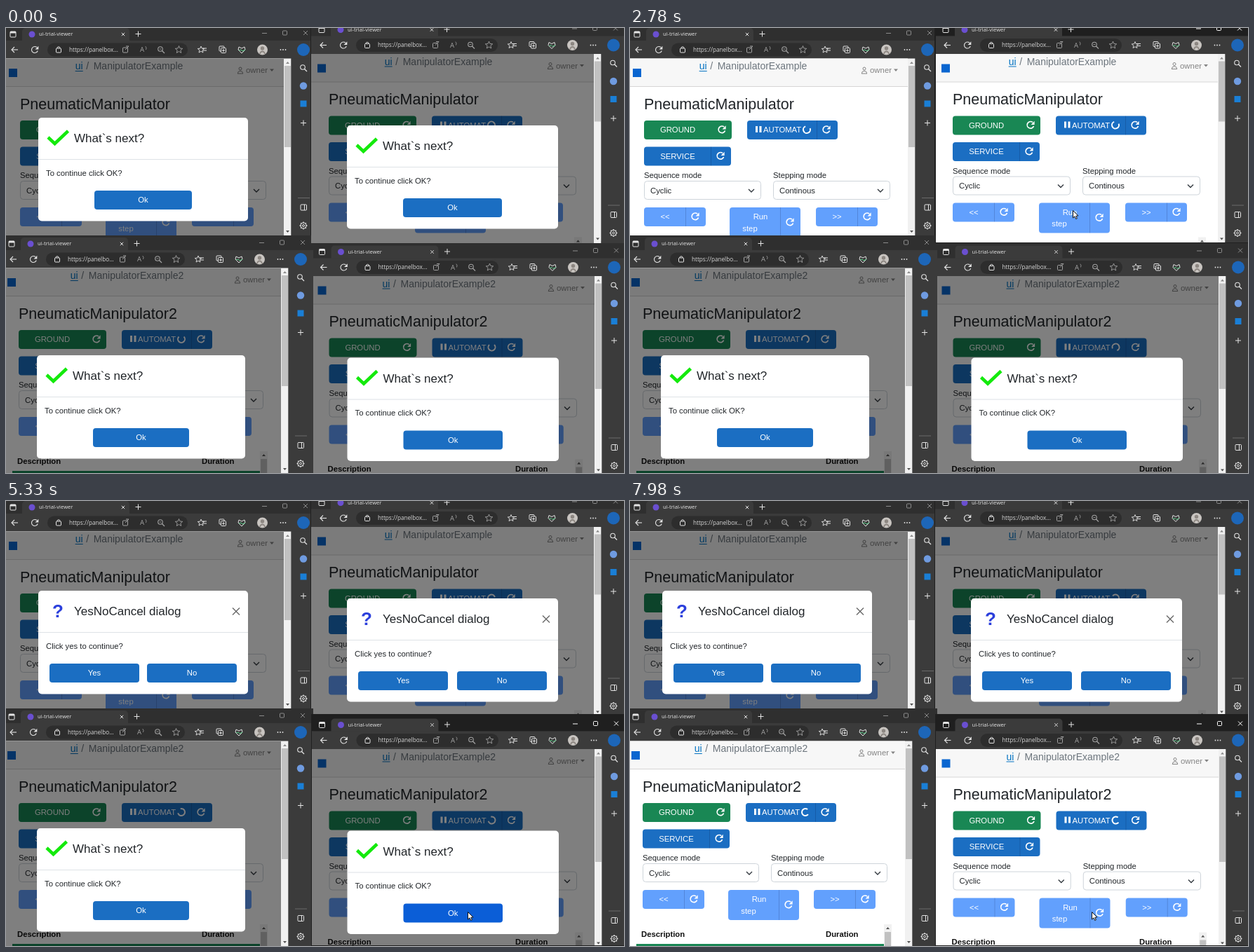
These frames come from a looping animation (881 by 635 pixels, 8 s). An HTML page with a canvas:

```html
<!DOCTYPE html>
<html lang="en">
<head>
<meta charset="utf-8">
<title>Manipulator panels</title>
<style>
  html, body { margin: 0; width: 100%; height: 100%; overflow: hidden; background: #333; }
  canvas { display: block; }
</style>
</head>
<body>
<canvas id="stage" width="881" height="635"></canvas>
<script>
const ctx = document.getElementById('stage').getContext('2d');
const LOOP = 8000, SPIN = 780;
const TOP_CLOSE = 1660, TOP_ASK = 4650, BOTTOM_CLICK = 5270, BOTTOM_CLOSE = 5400;
const PAGE_FONT = '"Liberation Sans", Arial, sans-serif';
const UI_FONT = '"Open Sans", "Noto Sans", sans-serif';
const BLUE = '#1b6ec2', HOVER = '#0b5ed7', GREEN = '#198754', PALE = '#62a0fd', INK = '#212529';
const CHROME = '#3b3b3b', ICON = '#e4e4e4', DIM = '#a2a2a2';
const PAGE_TOP = 43.5;

// x, y: origin of the contents; w: page width; rect: outer bounds on the stage
const topLeft = { x: 0, y: 0, w: 396, rect: [0, 0, 434, 296], thumb: 170, down: 290, panel: 256, dialogY: 128,
  name: '', url: 'https://panelbox...', phase: Math.PI };
const topRight = { x: 440, y: -6.5, w: 398, rect: [435, 0, 446, 307], thumb: 140, down: 307, panel: 273, dialogY: 145.5,
  name: '', url: 'https://panelbox...', phase: Math.PI };
const bottomLeft = { x: -2, y: 299, w: 394, rect: [0, 296, 438, 339], thumb: 212, down: 330, panel: 296.5, dialogY: 168,
  name: '2', url: 'https://panelbo...', phase: 0 };
const bottomRight = { x: 440.5, y: 310.5, w: 398.5, rect: [435, 304, 446, 331], thumb: 204.5, down: 320, panel: 288, dialogY: 160,
  name: '2', url: 'https://panelbox...', phase: 0 };

function text(str, x, y, size, color, { align = 'left', font = PAGE_FONT, bold = false } = {}) {
  ctx.font = `${bold ? 'bold ' : ''}${size}px ${font}`;
  ctx.textAlign = align;
  ctx.fillStyle = color;
  ctx.fillText(str, x, y + size * 0.35);
}
function rect(x, y, w, h, color) {
  ctx.fillStyle = color;
  ctx.fillRect(x, y, w, h);
}
function rounded(x, y, w, h, r, fill, stroke) {
  ctx.beginPath();
  ctx.roundRect(x, y, w, h, r);
  if (fill) { ctx.fillStyle = fill; ctx.fill(); }
  if (stroke) { ctx.strokeStyle = stroke; ctx.lineWidth = 1; ctx.stroke(); }
}
function path(points, color, width = 1, close = false) {
  ctx.beginPath();
  for (let i = 0; i < points.length; i += 2) ctx.lineTo(points[i], points[i + 1]);
  if (close) ctx.closePath();
  ctx.strokeStyle = color;
  ctx.lineWidth = width;
  ctx.stroke();
}
function shape(points, color) {
  ctx.beginPath();
  for (let i = 0; i < points.length; i += 2) ctx.lineTo(points[i], points[i + 1]);
  ctx.fillStyle = color;
  ctx.fill();
}
function disc(x, y, r, color) {
  ctx.beginPath();
  ctx.arc(x, y, r, 0, 7);
  ctx.fillStyle = color;
  ctx.fill();
}
function arc(x, y, r, from, to, color, width = 1) {
  ctx.beginPath();
  ctx.arc(x, y, r, from, to);
  ctx.strokeStyle = color;
  ctx.lineWidth = width;
  ctx.stroke();
}
const ring = (x, y, r, color, width) => arc(x, y, r, 0, 2 * Math.PI, color, width);
const plus = (x, y, r, color) => { path([x - r, y, x + r, y], color); path([x, y - r, x, y + r], color); };
const cross = (x, y, r, color, width) => {
  path([x - r, y - r, x + r, y + r], color, width);
  path([x - r, y + r, x + r, y - r], color, width);
};
function refresh(x, y, r = 4.8, color = '#fff', width = 1.7) {
  arc(x, y, r, 0.35, 5.4, color, width);
  shape([x + r + 0.8, y - r - 0.8, x + r + 0.8, y - 0.4, x + 0.6, y - 0.4], color);
}
function star(x, y, r, color) {
  const points = [];
  for (let i = 0; i < 10; i++) {
    const a = i * Math.PI / 5 - Math.PI / 2, d = i % 2 ? r * 0.45 : r;
    points.push(x + d * Math.cos(a), y + d * Math.sin(a));
  }
  path(points, color, 0.9, true);
}
function magnifier(x, y, color) {
  ring(x - 1, y - 1, 3.3, color, 1.1);
  path([x + 1.5, y + 1.5, x + 5, y + 5], color, 1.2);
}

function titleBar(win, active) {
  const s = win.w - 396, bar = active ? '#1f1f1f' : '#2f2f2f', control = active ? '#fff' : '#8c8c8c';
  rect(-8, -8, 460, 26, bar);
  rounded(23, 0, 153, 24, [5, 5, 0, 0], CHROME);
  rounded(6, 5, 8, 8, 1, null, ICON);
  rect(6, 5, 8, 2.5, ICON);
  disc(37, 9, 4.5, '#6a4fd0');
  text('ui-trial-viewer', 47, 8.7, 7.6, ICON, { font: UI_FONT });
  cross(167, 9, 2.2, ICON);
  plus(188.5, 8.5, 4, ICON);
  path([365 + s, 7.5, 372 + s, 7.5], control);
  rounded(394.5 + s, 4, 6, 6, 1, null, control);
  cross(427 + s, 7, 3, control);
}

function toolBar(win) {
  const s = win.w - 396, y = 31;
  rect(-8, 18, 460, 26, CHROME);
  path([17, y, 8, y], ICON, 1.1);
  path([12, y - 4, 8, y, 12, y + 4], ICON, 1.1);
  refresh(41, y, 4.5, ICON, 1.1);
  rounded(59, 21.5, 200 + s, 19, 9.5, '#2d2d2d');
  rounded(71.5, y - 2, 7, 6, 1, null, ICON);
  arc(75, y - 2, 2.2, Math.PI, 0, ICON);
  text(win.url, 90, y, 8.2, '#d6d6d6', { font: UI_FONT });
  ctx.save();
  ctx.translate(s, 0);
  rounded(166.5, y - 3, 7, 7, 1, null, DIM);
  path([170, y, 175, y - 5, 171, y - 5], DIM);
  text('A', 191, y, 9.5, DIM, { font: UI_FONT });
  arc(196, y - 2, 4, -0.8, 0.5, DIM, 0.8);
  magnifier(221, y, DIM);
  path([218.5, y - 1, 221.5, y - 1], DIM, 0.8);
  star(246.5, y, 5.5, DIM);
  star(278, y, 5, ICON);
  path([280, y - 2, 286, y - 2], ICON);
  path([281, y + 1, 286, y + 1], ICON);
  rounded(304, y - 5, 7, 7, 1, null, ICON);
  rounded(306.5, y - 2.5, 7, 7, 1, CHROME, ICON);
  plus(310, y + 1, 2, ICON);
  path([336, y + 5, 331, y, 332, y - 4, 336, y - 2, 340, y - 4, 341, y, 336, y + 5], ICON);
  path([332, y + 1, 335, y, 337, y + 2, 341, y], '#5bd18b');
  disc(365.5, y, 7.5, '#c9c5c1');
  disc(365.5, y - 2, 2.7, '#8d8782');
  arc(365.5, y + 6, 3.4, Math.PI, 0, '#8d8782', 2);
  for (let i = 0; i < 3; i++) disc(391.5 + i * 3.5, y, 0.9, ICON);
  ctx.restore();
}

function sideBar(win) {
  const x = win.w + 28;
  rect(win.w + 10.5, PAGE_TOP, 60, 320, CHROME);
  disc(x, 31, 9, '#1d66b8');
  magnifier(x, 57, ICON);
  disc(x, 82.5, 5.2, '#6f9be0');
  rect(x - 4.5, 103.5, 9, 9, '#1a7fd6');
  plus(x, 135.5, 4, ICON);
  path([x - 8, win.panel - 13.5, x + 9, win.panel - 13.5], '#6a6a6a');
  rounded(x - 4, win.panel - 4, 8.5, 8, 1, null, ICON);
  path([x + 1.5, win.panel - 4, x + 1.5, win.panel + 4], ICON);
  const gy = win.panel + 26;
  ring(x, gy, 4, ICON, 1.1);
  ring(x, gy, 1.5, ICON, 1);
  for (let a = 0; a < 8; a++) {
    const c = Math.cos(a * Math.PI / 4), n = Math.sin(a * Math.PI / 4);
    path([x + 4 * c, gy + 4 * n, x + 5.4 * c, gy + 5.4 * n], ICON, 1.3);
  }
}

function splitButton(x, y, w, h, color, split, label, labelX) {
  rounded(x, y, w, h, 4, color);
  if (color !== GREEN) rect(x + split, y, 1, h, 'rgba(0,0,40,.16)');
  refresh(x + split + 14, y + h / 2 - 0.7);
  if (label) text(label, x + labelX, y + 13.3, 11.3, '#fff', { align: 'center' });
}

function select(x, w, label, value) {
  text(label, x, 210.5, 11.3, INK);
  rounded(x + 0.5, 218.5, w - 1, 26, 4, '#fff', '#ced4da');
  text(value, x + 9, 232, 11.3, INK);
  path([x + w - 18, 230, x + w - 14, 234, x + w - 10, 230], '#343a40', 1.4);
}

function breadcrumb(win) {
  const size = 14, page = 'ManipulatorExample' + win.name;
  ctx.font = `${size}px ${PAGE_FONT}`;
  const x = 175.5 + (win.w - 396) / 2 - (26 + ctx.measureText(page).width) / 2;
  text('ui', x, 54.5, size, '#0071c1');
  rect(x, 61, 11, 1, '#0071c1');
  text('/', x + 15.5, 54.5, size, '#6c757d');
  text(page, x + 26, 54.5, size, '#6c757d');
}

function page(win, t) {
  const { w } = win, s = w - 396, gray = '#848484';
  rect(-8, PAGE_TOP, w + 8, 300, '#fff');
  rect(-8, PAGE_TOP, w + 8, 39.5, '#f7f7f7');
  rect(-8, 83, w + 8, 1, '#d6d5d5');
  rect(4, 58, 12, 12, '#0a66d0');
  breadcrumb(win);
  ring(334 + s, 58, 2, gray, 1);
  arc(334 + s, 65, 3.7, Math.PI, 0, gray, 1);
  path([330 + s, 65, 338 + s, 65], gray);
  text('owner', 342 + s, 60.5, 11.4, gray);
  shape([376 + s, 58.5, 382 + s, 58.5, 379 + s, 62], gray);

  text('PneumaticManipulator' + win.name, 20, 108, 21.5, INK);
  splitButton(20, 132, 125, 27, GREEN, 97, 'GROUND', 48);
  splitButton(167, 132, 129, 27, BLUE, 99);
  rect(179, 140, 3, 9, '#fff');
  rect(184.5, 140, 3, 9, '#fff');
  text('AUTOMAT', 190, 145.3, 11.3, '#fff');
  const gap = 1.5 * Math.PI + win.phase + t / SPIN * 2 * Math.PI;
  arc(252, 145, 5, gap + Math.PI / 4, gap + Math.PI * 1.75, '#fff', 2);
  splitButton(20, 169.5, 124, 27, BLUE, 95, 'SERVICE', 48);

  const half = (w - 62) / 2;
  select(20, half, 'Sequence mode', 'Cyclic');
  select(37 + half, half, 'Stepping mode', 'Continous');
  splitButton(20, 256, 88, 27, PALE, 59, '<<', 30);
  const runX = 142 + (s > 0 ? 1 : 0);
  splitButton(runX, 256, 101, 43, PALE, 72);
  text('Run', runX + 44, 269.3, 11.3, '#fff', { align: 'center' });
  text('step', runX + 29, 286, 11.3, '#fff', { align: 'center' });
  splitButton(265 + s / 2, 256, 88, 27, PALE, 59, '>>', 30);

  text('Description', 18, 319, 11.3, '#111', { bold: true });
  text('Duration', 283 + s, 319, 11.3, '#111', { bold: true });
  rect(11, 333, 356, 6, GREEN);
  rect(367 + s * 1.5, 305, 11, 40, '#f1f1f1');
  shape([370 + s * 1.5, 312, 375 + s * 1.5, 312, 372.5 + s * 1.5, 309], '#505050');
  rect(368 + s * 1.5, 316, 9, 30, '#c1c1c1');
}

function scrollBar(win) {
  const x = win.w;
  rect(x, PAGE_TOP, 10.5, 300, '#f1f1f1');
  rect(x + 1, 54, 9, win.thumb - 54, '#c1c1c1');
  shape([x + 3, 51, x + 8, 51, x + 5.5, 48], '#8a8a8a');
  shape([x + 3, win.down - 1, x + 8, win.down - 1, x + 5.5, win.down + 2], '#505050');
}

function dialogButton(x, w, label, hover) {
  rounded(x, 104, w, 27, 4, hover ? HOVER : BLUE);
  text(label, x + w / 2, 117.5, 11.3, '#fff', { align: 'center' });
}

function dialog(win, kind, hover) {
  const w = win.w - 97;
  ctx.save();
  ctx.translate(46, win.dialogY);
  rounded(0, 0, w, 147.5, 5, '#fff');
  rect(0, 59, w, 1, '#dee2e6');
  if (kind === 'ok') {
    path([14, 28, 23.5, 37, 42.5, 19], '#14ea0c', 4.6);
    text("What`s next?", 51, 29.3, 17, INK);
    text('To continue click OK?', 11, 79, 11.3, INK);
    dialogButton(80, w - 160, 'Ok', hover);
  } else {
    text('?', 28, 29, 26, '#2b3fdc', { align: 'center', bold: true });
    text('YesNoCancel dialog', 51, 29.3, 17, INK);
    cross(w - 17, 29.5, 5, '#6a6a6a', 1.4);
    text('Click yes to continue?', 11, 79, 11.3, INK);
    dialogButton(16, 128, 'Yes');
    dialogButton(w - 144, 128, 'No');
  }
  ctx.restore();
}

function drawWindow(win, t, { active, kind, hover }) {
  const [x, y, w, h] = win.rect;
  ctx.save();
  ctx.beginPath();
  ctx.rect(x, y, w, h);
  ctx.clip();
  ctx.translate(win.x, win.y);
  titleBar(win, active);
  toolBar(win);
  page(win, t);
  if (kind) rect(-8, PAGE_TOP, win.w + 8, 300, 'rgba(0,0,0,.5)');
  scrollBar(win);
  sideBar(win);
  if (kind) dialog(win, kind, hover);
  ctx.restore();
  if (active) {
    rect(x, y, 1, h, '#202020');
    rect(x, y + h - 1, w, 1, '#202020');
  }
}

// time, x, y of the pointer tip
const route = [[70, 838, 602], [850, 690, 380], [1250, 631, 259], [2900, 631, 260], [3500, 634, 258],
  [4600, 634, 258], [4950, 658, 586], [LOOP, 658, 586]];

function pointerAt(t) {
  const i = Math.max(1, route.findIndex(([time]) => time > t));
  const [t0, x0, y0] = route[i - 1], [t1, x1, y1] = route[i];
  const k = (t - t0) / (t1 - t0), ease = k * k * (3 - 2 * k);
  return [x0 + (x1 - x0) * ease, y0 + (y1 - y0) * ease];
}

function outlined(points) {
  shape(points, '#fff');
  path(points, '#111', 1, true);
}

function pointer(t) {
  if (t < 70) return;
  const [x, y] = pointerAt(t);
  const clicking = (t >= 1550 && t < TOP_CLOSE) || (t >= 5180 && t < BOTTOM_CLICK);
  const hand = (t >= 1200 && t < TOP_CLOSE) || (t >= 4940 && t < BOTTOM_CLICK);
  if (clicking) disc(x, y + 1, 8, 'rgba(190,185,40,.7)');
  ctx.save();
  ctx.translate(x, y);
  if (hand) outlined([-1, 1, 1, 1, 1.5, 6, 6, 7, 6.5, 11, 5, 15, -1, 15, -4.5, 9, -3, 8.5, -1, 10]);
  else outlined([0.5, 0.5, 0.5, 11, 3, 8.8, 4.7, 12.5, 6.4, 11.7, 4.8, 8.2, 8, 8]);
  ctx.restore();
}

function draw(now) {
  const t = now % LOOP;
  const bottomActive = t >= BOTTOM_CLICK, topActive = t >= 1590 && !bottomActive;
  const topKind = t < TOP_CLOSE ? 'ok' : t >= TOP_ASK ? 'ask' : null;
  const bottomKind = t < BOTTOM_CLOSE ? 'ok' : null;
  const upper = () => drawWindow(topRight, t, { active: topActive, kind: topKind, hover: t >= 1200 });
  const lower = () => drawWindow(bottomRight, t, { active: bottomActive, kind: bottomKind, hover: t >= 4930 });

  drawWindow(topLeft, t, { kind: topKind });
  rect(434, 0, 1, 296, '#202020');
  (bottomActive ? upper : lower)();
  drawWindow(bottomLeft, t, { kind: bottomKind });
  (bottomActive ? lower : upper)();
  pointer(t);
}

const start = performance.now();
(function frame() {
  draw(performance.now() - start);
  requestAnimationFrame(frame);
})();
</script>
</body>
</html>
```
